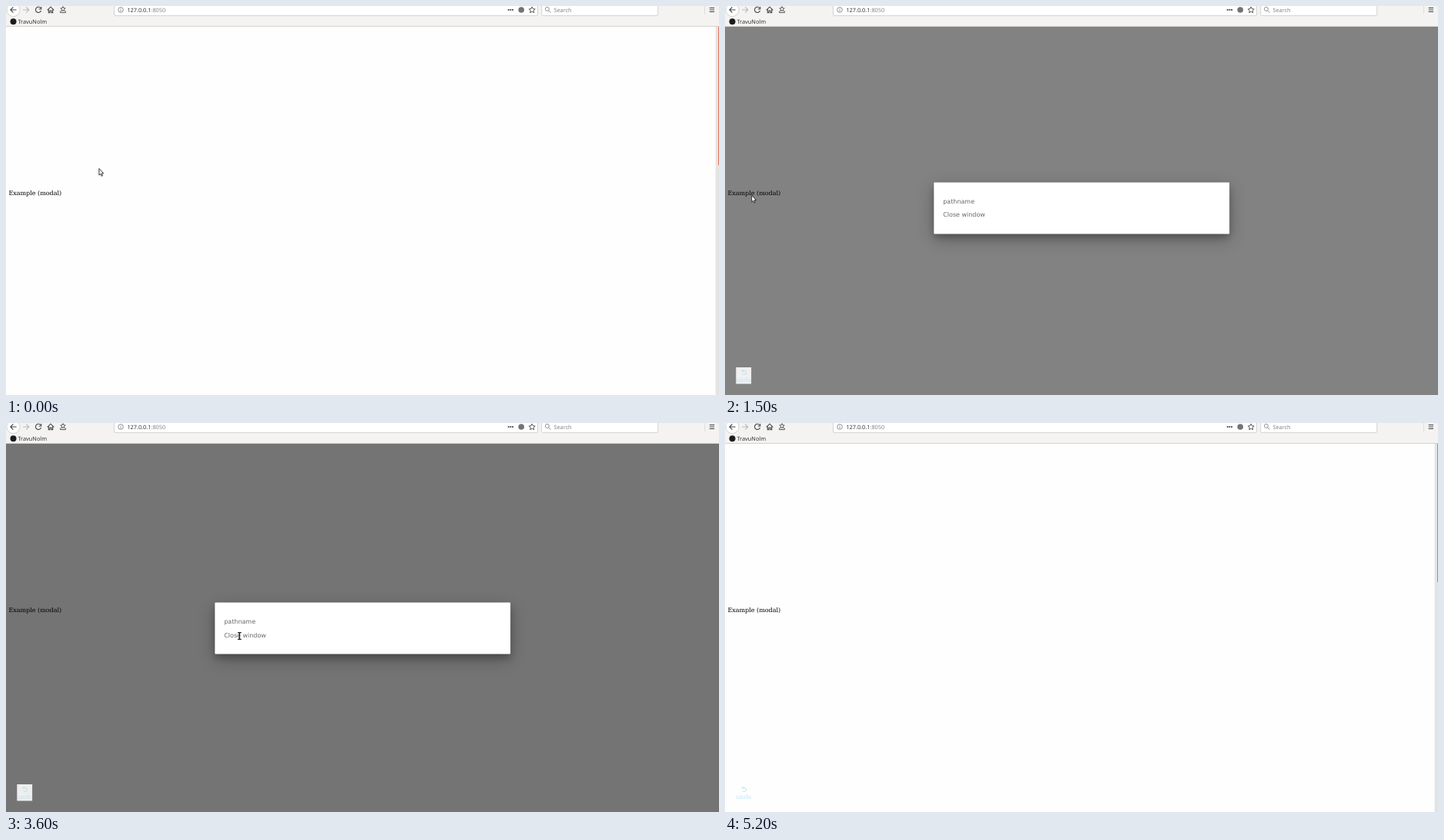
An HTML page for the animation above (5500 ms loop, 926 px wide and 506 px high).

```html
<!DOCTYPE html>
<html lang="en">
<head>
<meta charset="utf-8">
<title>Modal example</title>
<style>
  html, body { margin: 0; width: 100%; height: 100%; overflow: hidden; background: #fefefe; }
  svg { display: block; width: 100%; height: 100%; }
  text { text-rendering: geometricPrecision; white-space: pre; }
  .ui { font: 7.33px "Noto Sans", "Open Sans", sans-serif; fill: #333; }
  .serif { font: 8px "DejaVu Serif", serif; }
  .sans { font: 8px "DejaVu Sans", sans-serif; fill: #000; fill-opacity: .6; }
  .icon { fill: none; stroke: #444; stroke-width: 1.1; }
  .field { fill: #fff; stroke: #c9c9c7; stroke-width: .8; }
  .thin { stroke: #777; stroke-width: .8; }
  .ui.muted, .muted { fill: #858585; }
</style>
</head>
<body>
<svg viewBox="0 0 926 506">
  <rect width="926" height="506" fill="#fefefe"/>
  <text class="serif" x="3.4" y="246.4">Example (modal)</text>
  <rect id="overlay" y="27" width="926" height="479"/>

  <g id="undo">
    <rect id="undoBox" x="14.3" y="470" width="19.8" height="21.5" fill="#fff" opacity=".88"/>
    <path d="M22.3 474.6H25.2A2.3 2.3 0 0 1 25.2 479.2H22.6M23.6 473L22 474.6L23.6 476.2" fill="none" stroke="#b5def2" stroke-width=".9"/>
    <text class="serif" x="14.2" y="489.3" fill="#c6e4f2">undo</text>
  </g>

  <g id="modal">
    <rect x="271.3" y="240.5" width="383.8" height="67" opacity=".25" style="filter:blur(11.25px)"/>
    <rect x="271.3" y="238.5" width="383.8" height="67" opacity=".22" style="filter:blur(4.5px)"/>
    <rect x="271.3" y="233.5" width="383.8" height="67" rx="1" fill="#fff"/>
    <text class="sans" x="283.2" y="261">pathname</text>
    <text class="sans" x="283.2" y="278.5">Close window</text>
  </g>

  <g id="scrollbar">
    <rect x="921.5" y="27" width="4.5" height="479" fill="#e4e4e3"/>
    <rect x="925" y="27" width="1" height="180" fill="#e5745a"/>
  </g>

  <g id="toolbar">
    <rect width="926" height="27" fill="#f4f3f2"/>
    <path d="M0 26.5H926" stroke="#d3d2d0"/>
    <circle class="field" cx="9.5" cy="5" r="8.6"/>
    <path class="icon" d="M13.6 5H6M9.4 1.4L5.8 5L9.4 8.6"/>
    <path class="icon" style="stroke:#b9b9b7" d="M22 5H29.5M26.2 1.4L29.8 5L26.2 8.6"/>
    <path class="icon" d="M44.9 2.7A3.6 3.6 0 1 0 45.5 6M45.7 1V4H42.7"/>
    <path class="icon" d="M53.7 5.3L58 1.2L62.3 5.3M55.3 4.5V8.6H57V6H59V8.6H60.7V4.5"/>
    <polygon class="icon" id="trayStar" style="stroke-width:.9"/>
    <path class="icon" style="stroke-width:.9" d="M70.6 6.5V8.6H77.4V6.5"/>
    <rect class="field" x="140.5" y="-6" width="550" height="18.6" rx="1.5"/>
    <circle class="icon thin" cx="149" cy="5" r="3.3"/>
    <path class="icon thin" d="M149 4.5V7M149 2.8V3.6"/>
    <text class="ui" x="157.4" y="7.8">127.0.0.1<tspan class="muted">:8050</tspan></text>
    <path d="M651.8 5H659" stroke="#555" stroke-width="1.8" stroke-dasharray="1.8 .9"/>
    <circle cx="669.2" cy="5" r="3.8" fill="#737373"/>
    <polygon class="icon" id="pageStar" style="stroke-width:.9"/>
    <rect class="field" x="695.7" y="-6" width="151" height="18.6" rx="1.5"/>
    <circle class="icon thin" cx="702.9" cy="3.9" r="2.5"/>
    <path class="icon thin" d="M704.6 5.8L707.6 8.8"/>
    <text class="ui muted" x="711.4" y="7.8">Search</text>
    <path d="M907.5 0V11" stroke="#dededc"/>
    <path class="icon" d="M913.7 2.5H920M913.7 5H920M913.7 7.5H920"/>
    <circle cx="9.5" cy="20.3" r="4" fill="#1c1c1c"/>
    <text class="ui" x="15.4" y="23">TravuNolm</text>
  </g>

  <g id="cursor">
    <path id="arrow" d="M.4 .4V9L2.3 7.4L3.6 10.3L5 9.7L3.7 6.8H6.2Z" fill="#fff" stroke="#222" stroke-width=".9"/>
    <path id="beam" d="M-2.4-4.4H2.4M0-4.4V4.4M-2.4 4.4H2.4" stroke="#222" stroke-width="1.4"/>
  </g>
</svg>
<script>
  const LOOP = 5500, TICK = 100;
  const OPEN = 1352, CLOSE = 3924;
  const $ = id => document.getElementById(id);
  const show = (id, on) => $(id).setAttribute('display', on ? 'inline' : 'none');
  const clamp = x => Math.min(1, Math.max(0, x));
  const bezier = (k, a, b, c, d) =>
    a * (1 - k) ** 3 + 3 * b * k * (1 - k) ** 2 + 3 * c * k * k * (1 - k) + d * k ** 3;

  // Pointer gestures: each curves from the previous resting point to the next
  const home = [120.5, 211], link = [34.3, 245.8], left = [166, 190],
        above = [356, 195], close = [303.3, 277], exit = [22, -20];
  const moves = [
    { start: 300, end: 1000, curve: [home, [105, 200], [50, 240], link] },
    { start: 1800, end: 2400, curve: [link, [150, 330], [556, 115], left] },
    { start: 2400, end: 3000, curve: [left, [392, 150], [356, 183], above] },
    { start: 3000, end: 3600, curve: [above, [356, 225], [320, 265], close] },
    { start: 4200, end: 5200, curve: [close, [146, 156], [0, 30], exit] }
  ];

  function pointerAt(t) {
    const { start, end, curve } = moves.findLast(m => t >= m.start) || moves[0];
    const k = clamp((t - start) / (end - start));
    return [0, 1].map(axis => bezier(k, ...curve.map(p => p[axis])));
  }

  // CSS cubic-bezier(.23, 1, .32, 1), solved by bisection
  function easeOut(x) {
    let lo = 0, hi = 1;
    for (let i = 0; i < 24; i++) {
      const mid = (lo + hi) / 2;
      if (bezier(mid, 0, .23, .32, 1) < x) lo = mid; else hi = mid;
    }
    return bezier(lo, 0, 1, 1, 1);
  }

  function star(id, cx, cy, r) {
    const points = Array.from({ length: 10 }, (_, i) => {
      const angle = i * Math.PI / 5, radius = i % 2 ? r * .48 : r;
      return [cx + radius * Math.sin(angle), cy - radius * Math.cos(angle)];
    });
    $(id).setAttribute('points', points.join(' '));
  }

  function draw(t) {
    const closing = t >= CLOSE;
    const progress = ms => easeOut(clamp((t - (closing ? CLOSE : OPEN)) / ms));
    const fade = progress(400), slide = progress(450);
    const open = t >= OPEN && t < CLOSE + 450;

    $('overlay').setAttribute('opacity', .54 * (closing ? 1 - fade : fade));
    show('modal', open);
    $('modal').setAttribute('opacity', closing ? 1 - slide : 1);
    $('modal').setAttribute('transform',
      `translate(${closing ? -2.4 : 0} ${-32 * (closing ? slide : 1 - slide)})`);
    show('scrollbar', t < OPEN || closing);
    show('undo', t >= 1300);
    show('undoBox', open);

    const overText = t >= 800 && t < 1300 || t >= 3500 && t < 4200;
    show('beam', overText);
    show('arrow', !overText);
    $('cursor').setAttribute('transform', `translate(${pointerAt(t)})`);
  }

  star('trayStar', 74, 4, 3.3);
  star('pageStar', 683.2, 5.3, 4.2);

  const start = performance.now();
  function frame() {
    const t = (performance.now() - start) % LOOP;
    draw(Math.floor(t / TICK) * TICK);
    requestAnimationFrame(frame);
  }
  frame();
</script>
</body>
</html>
```
